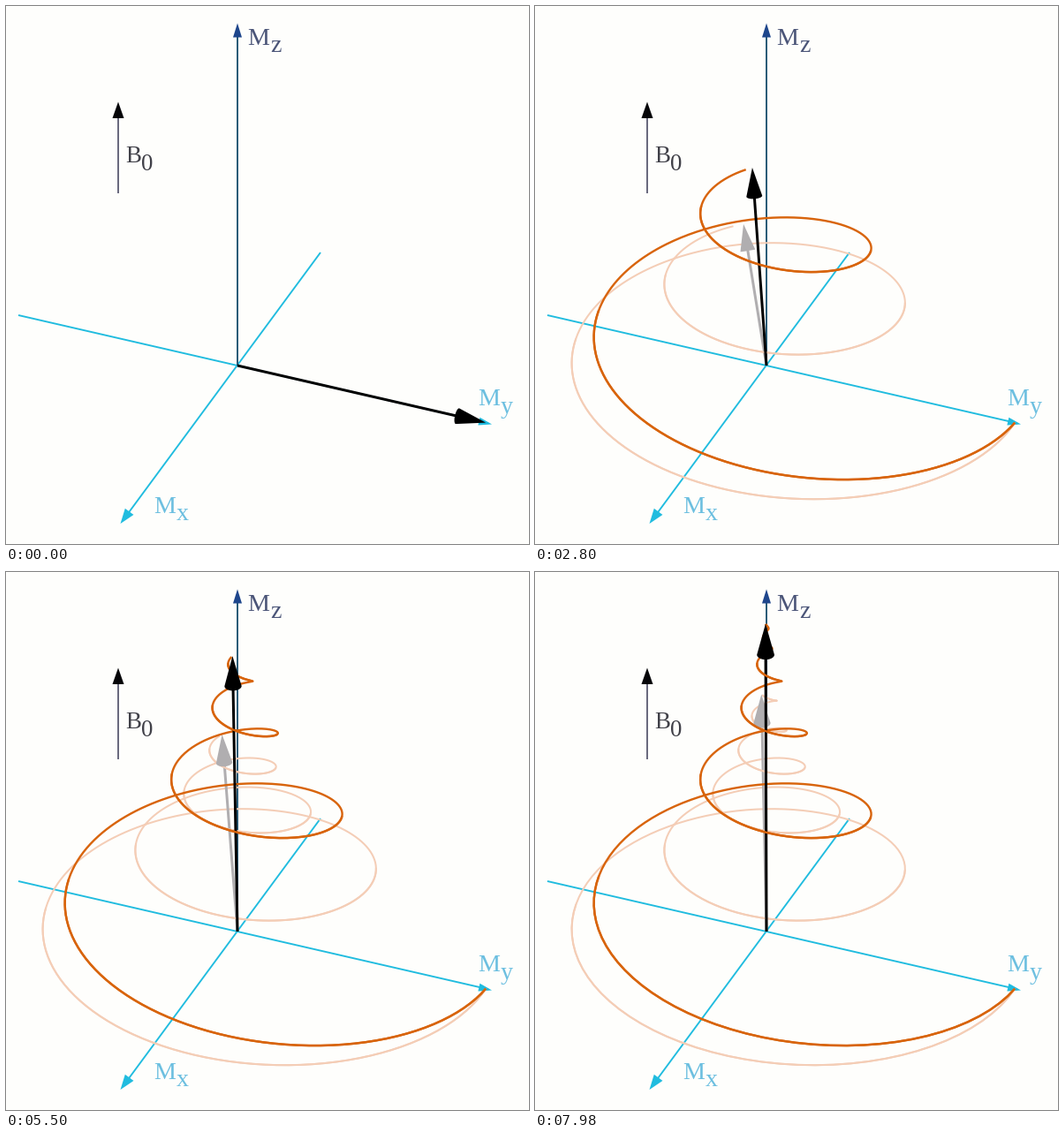
A matplotlib script that plays this animation: 592x609 px, repeating every 8000 ms.

```python
import math

import matplotlib.pyplot as plt
import numpy as np
from matplotlib.animation import FuncAnimation
from matplotlib.patches import Polygon

W, H = 592, 609
LOOP, TICK = 8000, 20
PX = 0.72  # points per pixel at 100 dpi

ORIGIN = np.array([262.0, 407.0])
X_AXIS = np.array([-108.0, 145.0])
Y_AXIS = np.array([261.0, 60.0])
Z_AXIS = np.array([0.0, -239.0])
DEPTH = np.array([0.165, 0.0716, 0.123])   # perspective gain per unit
VIEW = np.array([0.768, 0.318, 0.556])     # direction towards the viewer

TURN = math.radians(11.83)   # precession per step
LAG = 0.6 * TURN             # the trail ends a little behind the arrow
HEAD_LEN, HEAD_RADIUS = 0.107, 8.5

BACK = "#fefefc"
CYAN = "#20bcdf"
NAVY = "#1e468c"
TEAL = "#2a5c78"
LABEL = "#6cbfe0"


def triples(start, stop):
    """Three quick steps every 140 ms."""
    return [t + d for t in range(start, stop, 140) for d in (0, 20, 40)]


STEPS = np.array([20] + triples(120, 821) + [1180, 1220, 1240, 1280, 1440, 1580]
                 + triples(1680, 7981))


def moment(phi, decay, growth, full):
    """Magnetisation after precessing by phi: transverse decay, z recovery."""
    phi = np.asarray(phi, dtype=float)
    r = np.exp(-decay * phi)
    z = full * (1 - np.exp(-growth * phi))
    return np.stack([r * np.sin(phi), r * np.cos(phi), z], axis=-1)


def project(p):
    scale = 1 / (1 - p @ DEPTH)
    flat = p @ np.stack([X_AXIS, Y_AXIS, Z_AXIS])
    return ORIGIN + flat * scale[..., None], scale


def cone(m):
    """Outline of the arrow head and the middle of its base."""
    size = np.linalg.norm(m)
    tip, _ = project(m)
    base, scale = project(m * (1 - HEAD_LEN / size))
    along = tip - base
    along /= np.linalg.norm(along)
    across = np.array([-along[1], along[0]])
    radius = HEAD_RADIUS * scale
    flat = abs(m @ VIEW) / size
    a = np.linspace(0, math.pi, 20)[:, None]
    rim = base + radius * (np.cos(a) * across - flat * np.sin(a) * along)
    return np.vstack([tip, rim]), base


fig = plt.figure(figsize=(W / 100, H / 100), dpi=100, facecolor=BACK)
ax = fig.add_axes([0, 0, 1, 1])
ax.set_xlim(0, W)
ax.set_ylim(H, 0)
ax.axis("off")


def line(start, end, color, width, z=1):
    ax.plot([start[0], end[0]], [start[1], end[1]], color=color,
            lw=width * PX, zorder=z, solid_capstyle="butt")


def head(tip, tail, length, half, color):
    tip, tail = np.array(tip, float), np.array(tail, float)
    u = (tip - tail) / np.linalg.norm(tip - tail)
    n = np.array([-u[1], u[0]])
    back = tip - length * u
    ax.add_patch(Polygon([tip, back + half * n, back - half * n],
                         fc=color, lw=0, zorder=2))


def label(x, y, main, sub, dx, dy, color, size=28):
    for tx, ty, s in ((x, y, main), (x + dx, y + dy, sub)):
        ax.text(tx, ty, s, family="Liberation Serif", fontsize=size * PX,
                color=color, va="baseline", ha="left", zorder=3)


line((14, 350), (546, 472.3), CYAN, 1.9)
line((356, 279), (134, 580), CYAN, 1.9)
line((262, 407), (262, 30), TEAL, 2)
line((127, 212), (127, 124), "#5a5a70", 1.8)
head((550, 473.5), (262, 407), 15, 4.5, CYAN)
head((129.5, 586), (262, 407), 17, 6, CYAN)
head((262, 19.5), (262, 407), 16, 5, NAVY)
head((127, 108.5), (127, 212), 18.5, 6.5, "#050508")

label(273, 44, "M", "z", 26, 8, "#4b5578")
label(135.5, 177, "B", "0", 17, 9, "#404048", 27)
label(534, 452, "M", "y", 26, 9, LABEL)
label(167, 574, "M", "x", 26, 8, LABEL)


class Spin:
    """A precessing arrow with the trail of its tip."""

    def __init__(self, decay, growth, full, trail, width, color, z):
        self.rates = decay, growth, full
        self.under = self.stroke(trail, width, z)
        self.shaft = self.stroke(color, 3, z + 1)
        self.over = self.stroke(trail, width, z + 2)
        self.head = ax.add_patch(Polygon([(0, 0)] * 3, fc=color, lw=0,
                                         zorder=z + 3))

    @staticmethod
    def stroke(color, width, z):
        return ax.plot([], [], color=color, lw=width * PX, zorder=z,
                       solid_capstyle="butt")[0]

    def update(self, phi):
        m = moment(phi, *self.rates)
        outline, base = cone(m)
        self.head.set_xy(outline)
        self.shaft.set_data(*np.stack([ORIGIN, base]).T)

        path = moment(np.linspace(0, max(phi - LAG, 0), 500), *self.rates)
        pts, _ = project(path)
        near = path[:, :2] @ DEPTH[:2] > 0
        self.under.set_data(*pts.T)
        self.over.set_data(*np.where(near[:, None], pts, np.nan).T)


slow = Spin(0.1062, 0.0405, 1.347, "#f4cdb6", 2, "#b0aeb0", 4)
fast = Spin(0.159, 0.0827, 1.322, "#d8640c", 2.4, "#000000", 8)


def draw(i):
    count = np.searchsorted(STEPS, i * TICK, side="right")
    slow.head.set_visible(count > 0)
    slow.shaft.set_visible(count > 0)
    for spin in (slow, fast):
        spin.update(count * TURN)
    return []


anim = FuncAnimation(fig, draw, frames=LOOP // TICK, interval=TICK,
                     repeat=True, repeat_delay=0)
plt.show()
```
